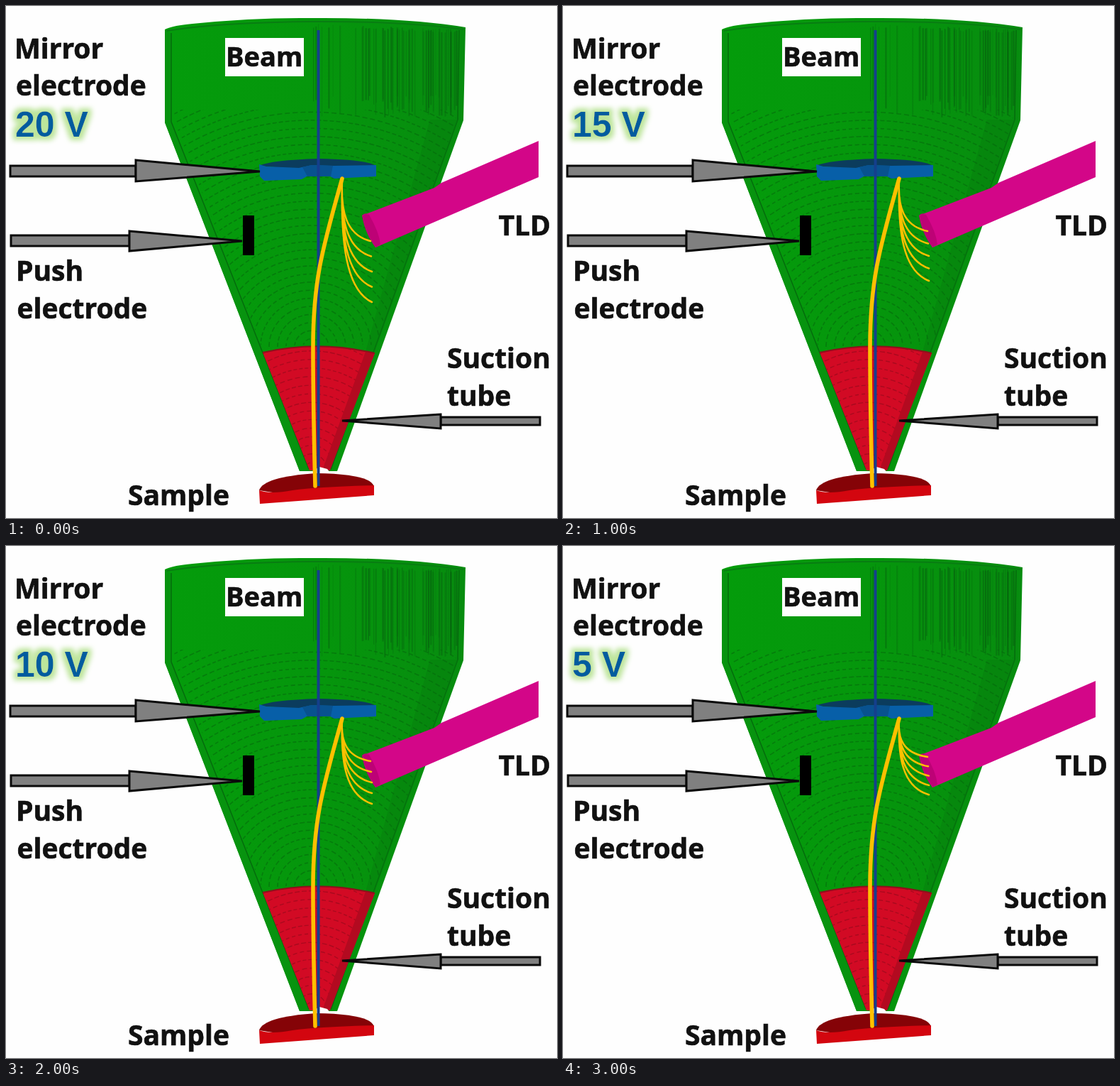
Write an HTML page that moves like this. It is 777 px wide and 721 px high and loops after 4000 ms.

```html
<!DOCTYPE html>
<html lang="en">
<head>
<meta charset="utf-8">
<title>Mirror electrode voltage</title>
<style>
  html, body { margin: 0; width: 100%; height: 100%; overflow: hidden; background: #fefefe; }
  svg { display: block; width: 777px; height: 721px; }
  .label { font: bold 39px "Open Sans", "Noto Sans", sans-serif; fill: #111; stroke: #111; stroke-width: .7; }
  .label .small { font-size: 38px; }
  #volts { font: bold 50px "Liberation Sans", Arial, sans-serif; fill: #005b9e; }
  .arrow { fill: #808080; stroke: #0a0a0a; stroke-width: 3; stroke-linejoin: miter; }
  .ray { fill: none; stroke: #ffc000; stroke-linecap: round; }
</style>
</head>
<body>
<svg viewBox="-1 0 777 721">
  <defs>
    <linearGradient id="green">
      <stop offset="0" stop-color="#049c0b"/>
      <stop offset=".5" stop-color="#05960c"/>
      <stop offset="1" stop-color="#078c0f"/>
    </linearGradient>
    <filter id="glow" x="-30%" y="-40%" width="160%" height="180%">
      <feMorphology in="SourceAlpha" operator="dilate" radius="5"/>
      <feGaussianBlur stdDeviation="3.6" result="halo"/>
      <feFlood flood-color="#bde59b"/>
      <feComposite in2="halo" operator="in"/>
      <feMerge><feMergeNode/><feMergeNode in="SourceGraphic"/></feMerge>
    </filter>
    <clipPath id="inner"><path d="M234 146H634V160L520 478Q440 470 361 484L238 166Z"/></clipPath>
    <clipPath id="tube"><path d="M361 488Q440 470 519 489L455 654H427Z"/></clipPath>
  </defs>

  <!-- housing -->
  <path fill="url(#green)" d="M223 33Q232 28 262 25Q350 16 430 17Q560 16 647 30L644 161L466 655H413L223 164Z"/>
  <path fill="none" stroke="#087d12" stroke-width="2" d="M225 35Q300 23 430 22Q560 21 645 33"/>
  <path fill="#07930f" d="M223 34L232 39V163L426 655H413L223 164Z"/>
  <path fill="none" stroke="#056c0d" stroke-width="1.5" d="M232 38V163L426 652M638 34L636 160L457 653"/>
  <path fill="#067c0e" opacity=".4" d="M597 160H637L519 487H506Z"/>
  <g id="streaks" stroke="#07690f"></g>
  <g id="rings" clip-path="url(#inner)" fill="none" stroke="#056a0c" stroke-width="1.6"></g>

  <!-- suction tube -->
  <path fill="#d20a24" d="M361 488Q440 470 519 489L455 654H427Z"/>
  <g id="tubeRings" clip-path="url(#tube)" fill="none" stroke="#8e0a1c" stroke-width="1.4"></g>
  <path fill="#b30a20" d="M519 489L506 487L445 654H456Z"/>
  <path fill="none" stroke="#8e101b" stroke-width="2" d="M361 488Q440 470 519 489"/>
  <path fill="#fefefe" d="M428 657L441 649L452 652L456 657Z"/>

  <!-- sample -->
  <path fill="#850307" d="M356 682Q362 663 436 658Q514 659 518 677L400 689Z"/>
  <path fill="#d3060f" d="M356 682Q372 688 403 682Q440 677 518 675V689L357 701Z"/>

  <!-- mirror disc -->
  <path fill="#0b3c5d" d="M356 225Q372 217 440 215Q505 216 521 225L440 232Z"/>
  <path fill="#075fa8" d="M356 223L366 226L412 228L430 224L462 225L521 224V240L462 243L456 240H423L416 244L363 246L357 240Z"/>
  <path fill="#08528f" d="M417 227L430 224L460 225L457 240H424Z"/>

  <!-- detector -->
  <path fill="#d30688" d="M501 295L603 256L613 249L750 190V241L520 340Z"/>
  <path fill="#bd0276" d="M501 295Q505 290 511 294Q525 318 527 336L520 340Q505 320 501 295Z"/>

  <path stroke="#143f8c" stroke-width="4" d="M439.5 34V676"/>
  <path class="ray" stroke-width="5.6" stroke-linecap="butt" d="M435 676C433 600 432 540 432 480C432 390 444 345 473 243"/>
  <path id="fan" class="ray" stroke-width="2.5"/>

  <g class="arrow">
    <path d="M5 225H182V240H5Z"/><path d="M182 217L357 233L182 247Z"/>
    <path d="M6 323H173V338H6Z"/><path d="M173 317L332 331L173 345Z"/>
    <path d="M752 579H612V590H752Z"/><path d="M612 575L473 584L612 595Z"/>
  </g>
  <path d="M333 295H349V351H333Z"/>
  <path fill="#fefefe" d="M308 45H419V99H308Z"/>

  <g class="label">
    <text x="11" y="74">Mirror</text>
    <text x="13" y="126">electrode</text>
    <text class="small" x="309" y="85">Beam</text>
    <text x="693.5" y="323">TLD</text>
    <text x="13" y="387">Push</text>
    <text x="14.5" y="440">electrode</text>
    <text x="621" y="510">Suction</text>
    <text x="621" y="563">tube</text>
    <text x="171" y="703">Sample</text>
  </g>
  <text id="volts" x="12" y="184" filter="url(#glow)"></text>
</svg>
<script>
const get = id => document.getElementById(id);

// Voltage, end height of the top ray, gap between ray ends
const states = [
  { volts: 20, top: 331, gap: 21.5 },
  { volts: 15, top: 317, gap: 17.5 },
  { volts: 10, top: 303, gap: 15 },
  { volts: 5, top: 297, gap: 13.3 }
];
const HOLD = 1000;

let seed = 7;
function random() {
  seed = (seed * 16807) % 2147483647;
  return seed / 2147483647;
}

function drawStreaks() {
  let out = "";
  for (let i = 0; i < 64; i++) {
    const x = 432 + 204 * Math.pow(random(), 0.6);
    const y = 25 + (x - 432) * 0.035 + random() * 6;
    const end = 125 + random() * 32;
    const width = 0.8 + random() * 1.6;
    const alpha = 0.25 + random() * 0.45;
    out += `<path d="M${x} ${y}V${end}" stroke-width="${width}" opacity="${alpha}"/>`;
  }
  get("streaks").innerHTML = out;
}

function drawRings(id, cx, cy, step, count, flat, alpha) {
  let out = "";
  for (let i = 1; i <= count; i++) {
    const rx = i * step, ry = rx * flat;
    out += `<path d="M${cx - rx} ${cy}A${rx} ${ry} 0 0 1 ${cx + rx} ${cy}"
      stroke-dasharray="${5 + i % 3} ${3 + i % 2}" opacity="${alpha}"/>`;
  }
  get(id).innerHTML = out;
}

function ray(end, i) {
  const h = end - 245;
  const x = 513 + Math.min(i, 2);
  return `M473 245C471 ${245 + h * 0.5} 478 ${end - h * 0.1} ${x} ${end}`;
}

let shown = -1;
function update(time) {
  const index = Math.floor(time / HOLD) % states.length;
  if (index === shown) return;
  shown = index;
  const { volts, top, gap } = states[index];
  get("volts").textContent = volts + " V";
  get("fan").setAttribute("d", [0, 1, 2, 3, 4].map(i => ray(top + i * gap, i)).join(""));
}

drawStreaks();
drawRings("rings", 430, 480, 12, 34, 0.95, 0.6);
drawRings("tubeRings", 430, 655, 11, 18, 1.1, 0.6);

const start = performance.now();
function loop() {
  update(performance.now() - start);
  requestAnimationFrame(loop);
}
update(0);
requestAnimationFrame(loop);
</script>
</body>
</html>
```
